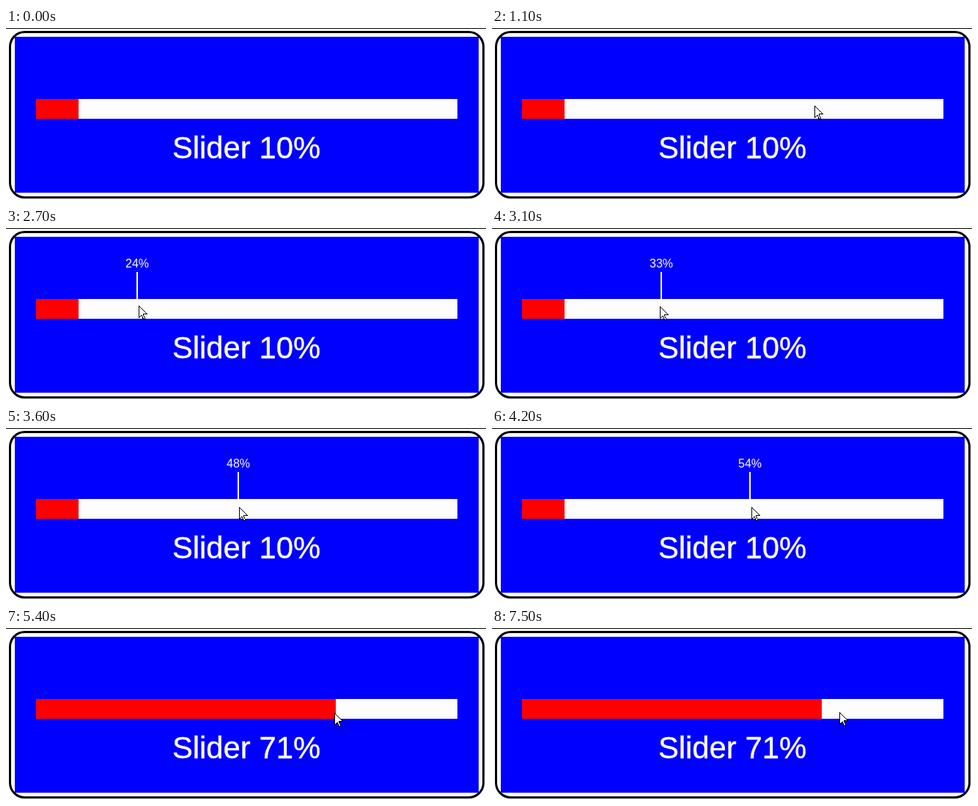
Write an HTML page that moves like this. It is 655 px wide and 235 px high and loops after 8 s.

```html
<!DOCTYPE html>
<html lang="en">
<head>
<meta charset="utf-8">
<title>Slider</title>
<style>
  html, body { margin: 0; width: 100%; height: 100%; overflow: hidden; background: #fff; }
  svg { display: block; width: 655px; height: 235px; }
  text { font-family: Arial, "Liberation Sans", sans-serif; fill: #fff; text-anchor: middle; }
  #title { font-size: 41.8px; stroke: #fff; stroke-width: .4px; }
  #hintText { font-size: 16px; }
  .crisp { shape-rendering: crispEdges; }
</style>
</head>
<body>
<svg viewBox="0 0 655 235">
  <rect class="crisp" width="655" height="1"/>
  <rect x="5.5" y="5.5" width="646" height="226" rx="20" fill="#fff" stroke="#000" stroke-width="3"/>
  <g class="crisp">
    <rect x="12" y="12" width="633" height="213" fill="#00f"/>
    <rect x="41" y="97" width="575" height="27" fill="#fdfdfd"/>
    <rect id="fill" x="41" y="97" height="27" fill="#f00"/>
  </g>
  <text id="title" x="328" y="178"></text>
  <g id="hint">
    <rect class="crisp" x="-1" y="60" width="2" height="37" fill="#fff"/>
    <text id="hintText" y="54"></text>
  </g>
  <path id="cursor" class="crisp" d="M.5 .5V16.5L4 13L6.5 18.5H8L8.5 17.5L6.5 12.5V11.5H11.5Z" fill="#fff" stroke="#000"/>
</svg>
<script>
const LOOP = 8000, STEP = 100, HOVER = 2400, CLICK = 5400;
const BAR_X = 41, PER_CENT = 5.75;

const linear = u => u;
const slowDown = u => u + u * u * (1 - u);
const speedUp = u => 1 - slowDown(1 - u);

// Pointer key points; each ease leads on to the next point.
const path = [
  { t: 800, x: 640, y: 123 },
  { t: 900, x: 585, y: 110, ease: slowDown },
  { t: 1600, x: 163, y: 97 },
  { t: 1900, x: 163, y: 106 },
  { t: 2400, x: 163, y: 106, ease: speedUp },
  { t: 3200, x: 240, y: 107, ease: slowDown },
  { t: 3900, x: 350, y: 108 },
  { t: 4100, x: 350, y: 108, ease: speedUp },
  { t: 4700, x: 427, y: 116 },
  { t: 4800, x: 427, y: 116 },
  { t: 4900, x: 448, y: 116 },
  { t: 7200, x: 448, y: 116 },
  { t: 7500, x: 474, y: 115 }
];

const $ = id => document.getElementById(id);
const fill = $("fill"), title = $("title"), hint = $("hint"), hintText = $("hintText"), cursor = $("cursor");
const show = (el, on) => el.setAttribute("visibility", on ? "visible" : "hidden");
const place = (el, x, y) => el.setAttribute("transform", `translate(${Math.round(x)} ${Math.round(y)})`);

function pointerAt(t) {
  const i = path.findLastIndex(p => p.t <= t);
  if (i < 0) return null;
  const a = path[i], b = path[i + 1];
  if (!b) return a;
  const u = (a.ease || linear)((t - a.t) / (b.t - a.t));
  return { x: a.x + (b.x - a.x) * u, y: a.y + (b.y - a.y) * u };
}

function draw(time) {
  const t = Math.floor(time / STEP) * STEP;
  const value = t < CLICK ? 10 : 71;
  fill.setAttribute("width", Math.ceil(value * PER_CENT));
  title.textContent = `Slider ${value}%`;

  const pos = pointerAt(t);
  show(cursor, pos);
  if (pos) place(cursor, pos.x, pos.y);

  const hovering = t >= HOVER && t < CLICK;
  show(hint, hovering);
  if (hovering) {
    const percent = Math.floor((pos.x - 39.5) / PER_CENT);
    place(hint, BAR_X + percent * PER_CENT, 0);
    hintText.textContent = percent + "%";
  }
}

let origin;
function tick(now) {
  origin ??= now;
  draw((now - origin) % LOOP);
  requestAnimationFrame(tick);
}
draw(0);
requestAnimationFrame(tick);
</script>
</body>
</html>
```
